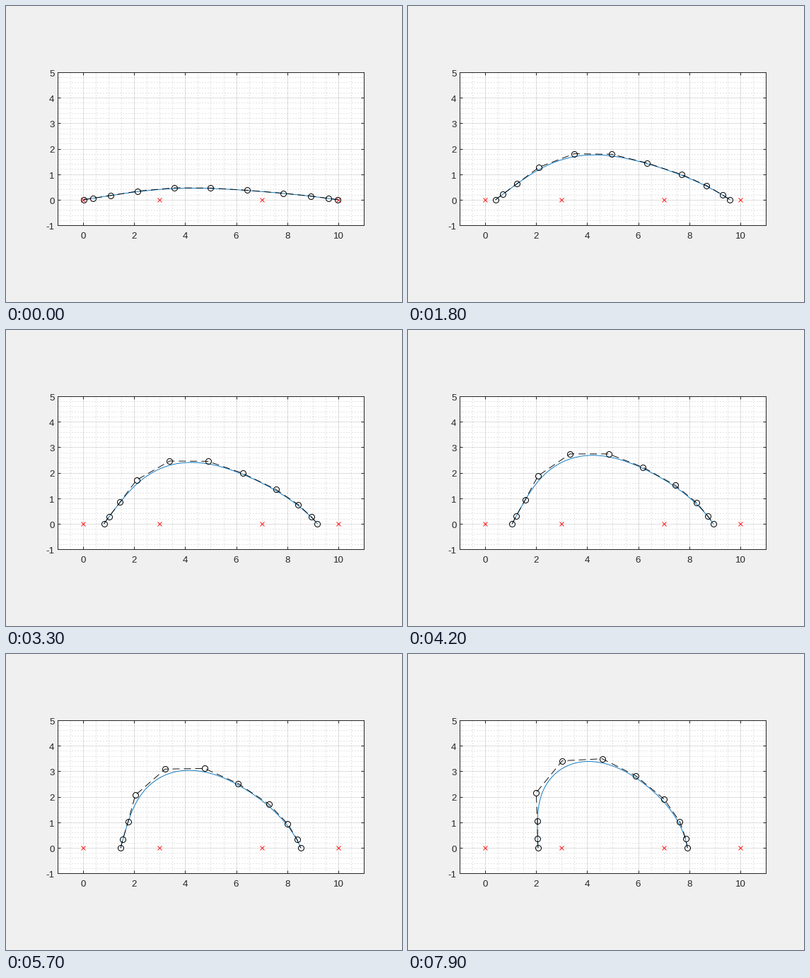
A matplotlib script that plays this animation: 560 by 420 pixels, repeating every 8000 ms.

```python
import numpy as np
import matplotlib.pyplot as plt
from matplotlib.animation import FuncAnimation
from matplotlib.ticker import MultipleLocator
from matplotlib.transforms import ScaledTranslation

W, H, DPI = 560, 420, 100
FRAMES, INTERVAL, HOLD = 80, 100, 4
PX = 72 / DPI
DARK = "#262626"
DEGREE, SPANS = 4, 7
COUNT = DEGREE + SPANS
LENGTH = 10
STEP = 0.0273  # inward travel of each end per frame

plt.rcParams.update({
    "font.family": "Liberation Sans",
    "font.size": 13.33 * PX,
    "axes.unicode_minus": False,
    "lines.scale_dashes": False,
})

KNOTS = np.clip(np.arange(COUNT + DEGREE + 1) - DEGREE, 0, SPANS)
# A straight beam has its control points at the knot averages.
REST = LENGTH / SPANS * np.array(
    [KNOTS[i + 1:i + 1 + DEGREE].mean() for i in range(1, COUNT - 1)])

# Inner control points with the beam partly and fully squeezed.
S_MID, S_FULL = 30, 76
MID = np.array([(1.02, 0.28), (1.45, 0.85), (2.09, 1.71),
                (3.39, 2.46), (4.89, 2.45), (6.25, 1.98),
                (7.55, 1.35), (8.43, 0.75), (8.95, 0.26)]).T
FULL = np.array([(2.06, 0.35), (2.05, 1.05), (2.00, 2.16),
                 (3.02, 3.41), (4.59, 3.49), (5.89, 2.83),
                 (7.01, 1.91), (7.63, 1.02), (7.86, 0.35)]).T


def parabola(s, mid, full):
    """Value at s of the parabola through 0, mid and full."""
    a, b = mid / S_MID, full / S_FULL
    return s * (a + (b - a) * (s - S_MID) / (S_FULL - S_MID))


def control_points(s):
    x = REST + parabola(s, MID[0] - REST, FULL[0] - REST)
    y = np.sqrt(parabola(s, MID[1] ** 2, FULL[1] ** 2))
    return np.r_[STEP * s, x, LENGTH - STEP * s], np.r_[0, y, 0]


def bspline_basis(u):
    def ramp(top, bottom):
        return top / bottom if bottom else 0 * top

    basis = [((u >= a) & (u < b)).astype(float) for a, b in zip(KNOTS, KNOTS[1:])]
    for d in range(1, DEGREE + 1):
        basis = [ramp(u - KNOTS[i], KNOTS[i + d] - KNOTS[i]) * basis[i]
                 + ramp(KNOTS[i + d + 1] - u, KNOTS[i + d + 1] - KNOTS[i + 1]) * basis[i + 1]
                 for i in range(len(basis) - 1)]
    return np.array(basis).T


BASIS = bspline_basis(np.linspace(0, SPANS - 1e-9, 201))

fig = plt.figure(figsize=(W / DPI, H / DPI), dpi=DPI, facecolor="#f0f0f0")
ax = fig.add_axes([73 / W, 1 - 311 / H, 433 / W, 217 / H])
ax.set(xlim=(-1, 11), ylim=(-1, 5))
ax.set_axisbelow(True)
for axis, major, minor in ((ax.xaxis, 2, 0.5), (ax.yaxis, 1, 0.2)):
    axis.set_major_locator(MultipleLocator(major))
    axis.set_minor_locator(MultipleLocator(minor))
    axis.set_major_formatter("{x:.0f}")
ax.grid(which="major", color=DARK, alpha=0.15, lw=PX)
ax.grid(which="minor", color="#1a1a1a", alpha=0.25, lw=PX,
        linestyle=(0, (PX, 3 * PX)))
ax.tick_params(which="major", direction="in", length=4.3 * PX, width=PX,
               color=DARK, labelcolor=DARK, top=True, right=True)
ax.tick_params(which="minor", length=0)
ax.tick_params(axis="x", pad=9.5 * PX)
ax.tick_params(axis="y", pad=4.5 * PX)
drop = ScaledTranslation(0, -1.5 / DPI, fig.dpi_scale_trans)
for label in ax.get_yticklabels():
    label.set_transform(label.get_transform() + drop)
for spine in ax.spines.values():
    spine.set(color=DARK, linewidth=PX)

ax.plot([0, 3, 7, 10], [0] * 4, "x", color="red", ms=5.8 * PX, mew=0.9 * PX)
curve, = ax.plot([], [], color="#0072bd", lw=0.9 * PX)
polygon, = ax.plot([], [], color="black", lw=0.9 * PX,
                   linestyle=(0, (10 * PX, 6 * PX)), dash_capstyle="butt")
nodes, = ax.plot([], [], "o", mfc="none", mec="black", ms=8 * PX, mew=PX)


def draw(n):
    x, y = control_points(max(0, n - HOLD) + 0.93)
    curve.set_data(BASIS @ x, BASIS @ y)
    polygon.set_data(x, y)
    nodes.set_data(x, y)
    return curve, polygon, nodes


anim = FuncAnimation(fig, draw, frames=FRAMES, interval=INTERVAL,
                     init_func=lambda: draw(0), repeat=True, repeat_delay=0)
plt.show()
```
